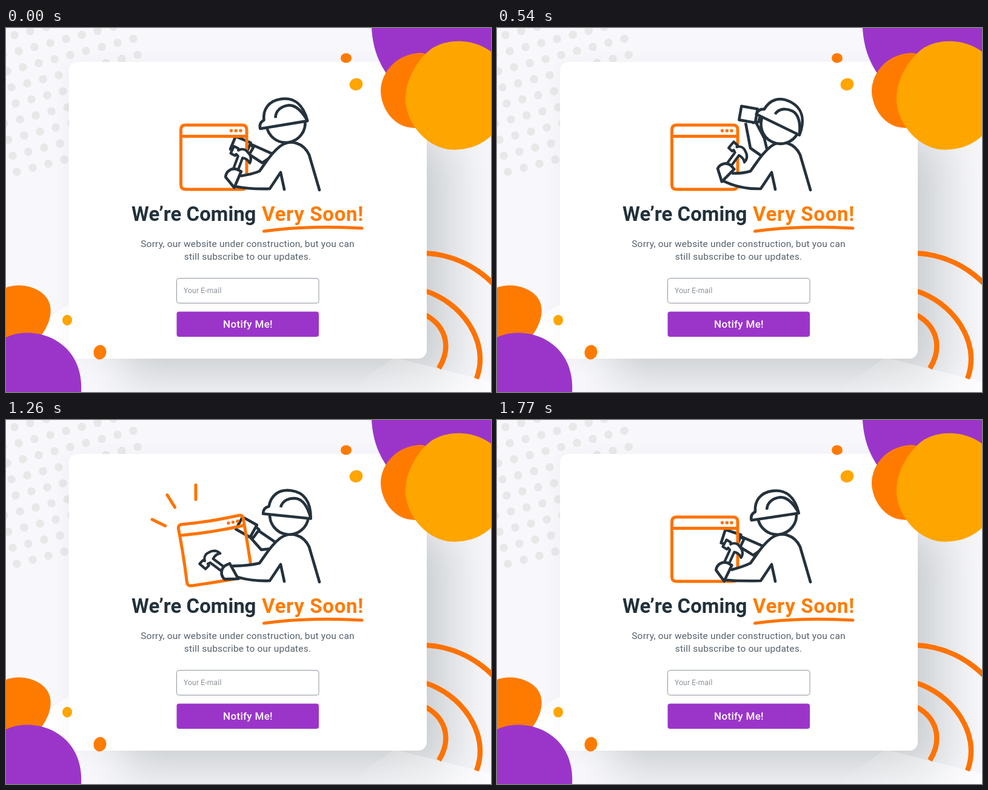
Recreate the animation shown at these times as an HTML page. Size 800 by 600 pixels, loop 1.8 s.

```html
<!DOCTYPE html>
<html lang="en">
<head>
<meta charset="utf-8">
<title>Coming soon</title>
<style>
  html, body { margin: 0; width: 100%; height: 100%; overflow: hidden; background: #f8f8fc; }
  svg { position: absolute; left: 0; top: 0; width: 800px; height: 600px; }
  text { font-family: Rubik, Roboto, Inter, sans-serif; }
  .title { font-size: 33px; font-weight: 700; }
  .note { font-size: 15.5px; letter-spacing: .2px; fill: #56616c; text-anchor: middle; }
  .hint { font-size: 12px; letter-spacing: .2px; fill: #8b9097; }
  .action { font-size: 17px; font-weight: 500; letter-spacing: .3px; fill: #fff; text-anchor: middle; }
  .orange { fill: #ff7b00; }
  .yellow { fill: #ffa500; }
  .purple { fill: #9b35ca; }
  .line { fill: none; stroke: #ff7200; stroke-width: 5; stroke-linejoin: round; }
  .ink { fill: #fff; stroke: #25323c; stroke-width: 4.6; stroke-linejoin: round; }
  .open { fill: none; }
</style>
</head>
<body>
<svg viewBox="0 0 800 600">
  <defs>
    <filter id="soft" x="-30%" y="-30%" width="160%" height="160%"><feGaussianBlur stdDeviation="36"/></filter>
    <filter id="faint" x="-30%" y="-30%" width="160%" height="160%"><feGaussianBlur stdDeviation="16"/></filter>
    <linearGradient id="fade"><stop stop-color="#fff" stop-opacity="0"/><stop offset="1" stop-color="#fff" stop-opacity=".6"/></linearGradient>
  </defs>
  <rect width="800" height="600" fill="#f8f8fc"/>
  <g id="dots" fill="#e8e8e9"></g>
  <path d="M0 520L104 456V600H0Z" fill="#fff"/>
  <rect x="104" y="60" width="590" height="485" fill="#8d9296" opacity=".09" filter="url(#faint)"/>
  <rect x="190" y="180" width="555" height="405" fill="#737f7d" opacity=".29" filter="url(#soft)"/>
  <path d="M640 543L800 583V600H560Z" fill="url(#fade)"/>
  <g class="line" style="stroke-width:8.5">
    <path d="M690 371C735 373 775 392 806 424"/>
    <path d="M690 433C748 450 800 515 776 578"/>
    <path d="M690 472C725 490 736 525 714 561"/>
  </g>
  <rect x="104" y="56" width="590" height="489" rx="14" fill="#fff"/>

  <path class="purple" d="M603 0C605 30 612 52 628 76L700 80L800 60V0Z"/>
  <path class="orange" d="M618 104C618 73 645 41 686 41L720 50V150L682 164C645 170 619 137 618 104Z"/>
  <path class="yellow" d="M659 116C659 85 680 48 705 32C735 15 775 20 800 39V178C780 196 755 203 728 200C690 193 659 155 659 116Z"/>
  <ellipse class="orange" cx="561" cy="49.500" rx="9" ry="8"/>
  <ellipse class="yellow" cx="577.500" cy="93" rx="11" ry="10" transform="rotate(-15 577 93)"/>
  <path class="orange" d="M0 428C20 420 50 425 65 442C80 460 74 485 58 507L0 530Z"/>
  <path class="purple" d="M0 510C20 500 50 500 75 511C110 528 126 560 124 600H0Z"/>
  <ellipse class="yellow" cx="101" cy="481.500" rx="8" ry="8.800"/>
  <ellipse class="orange" cx="155" cy="534.500" rx="10.500" ry="12" transform="rotate(12 155 534)"/>

  <text class="title" x="207" y="318" fill="#22313b">We’re Coming</text>
  <text class="title orange" x="422" y="318" letter-spacing=".7">Very Soon!</text>
  <path class="line" d="M425.500 335Q500 325 587 330" stroke-linecap="round"/>
  <text class="note" x="398.500" y="361">Sorry, our website under construction, but you can</text>
  <text class="note" x="398.500" y="382">still subscribe to our updates.</text>
  <rect x="281.500" y="412.500" width="234.500" height="41" rx="4" fill="#fff" stroke="#8f959d"/>
  <text class="hint" x="293" y="437">Your E-mail</text>
  <rect class="purple" x="281.500" y="467.500" width="234.500" height="41.500" rx="4"/>
  <text class="action" x="399" y="494">Notify Me!</text>

  <path id="farArm" class="ink"/>
  <g id="farHand" class="ink">
    <path d="M11 -9L20 -7L18 9L8 12"/>
    <path d="M-14 -12H13V11H-14Z"/>
  </g>
  <path id="frame" class="line"/>
  <path id="bar" class="line"/>
  <g id="buttons" fill="#ff7200"><circle r="2.700"/><circle r="2.700"/><circle r="2.700"/></g>
  <path id="body" class="ink" style="stroke:none"/>
  <path id="outline" class="ink open" stroke-linecap="round"/>
  <path id="hammer" class="ink" style="stroke-width:4.200"
    d="M-4 0L-4 -36L-8 -38L-9 -35L-17 -36L-16 -49L-8 -48L-7 -45C-3 -50 3 -51 8 -48C15 -45 19 -40 18 -32C14 -36 10 -37 4 -36L4 0Z"/>
  <path id="mitt" class="ink" d="M0 -14.500L-8 -15C-18 -14 -23 -4 -20 4L0 14.500Z"/>
  <g id="head" class="ink">
    <circle cx="466" cy="156" r="32"/>
    <path d="M423 159Q422 149 431 146C432 128 443 115.500 464 115.500C485 115.500 499 129 502 157.500Z"/>
    <path class="open" d="M450.500 145C452 133 463 127.500 474 127.500C486 128 495 140 501.500 156"/>
  </g>
  <g id="rays" class="line" stroke-linecap="round"></g>
</svg>
<script>
const LOOP = 1800, STEP = 30;
const HITS = [810, 1260], LOOK_UP = 540, LOOK_DOWN = 240;

const el = id => document.getElementById(id);
const set = (id, attrs) => { for (const k in attrs) el(id).setAttribute(k, attrs[k]); };
const mix = (a, b, k) => a + (b - a) * k;
const clamp = v => Math.max(0, Math.min(1, v));
const ease = k => (1 - Math.cos(Math.PI * clamp(k))) / 2;
const xy = p => p.map(v => v.toFixed(2)).join(' ');

// Soft hump: 0 to 1 before the peak, back to 0 after it.
const hump = (t, peak, rise, fall) => ease(1 - (t < peak ? (peak - t) / rise : (t - peak) / fall));

function turn(x, y, deg) {
  const r = deg * Math.PI / 180;
  return [x * Math.cos(r) - y * Math.sin(r), x * Math.sin(r) + y * Math.cos(r)];
}

// The worker looks up quickly, then sinks slowly over the rest of the loop.
function headTilt(t, recoil) {
  const sink = (t - LOOK_UP + LOOP) % LOOP / (LOOP - LOOK_UP + LOOK_DOWN);
  const base = sink <= 1 ? mix(27, -15, sink) : mix(-15, 27, ease((t - LOOK_DOWN) / (LOOK_UP - LOOK_DOWN)));
  return base + 6 * recoil;
}

function drawHead(tilt) {
  const shift = [Math.min(tilt * .53, 1), Math.abs(tilt) * .1];
  set('head', { transform: `translate(${xy(shift)}) rotate(${tilt} 466 157)` });
}

function drawWindow(jolt, recoil) {
  const w = 54.25 * (1 - .07 * recoil), h = 53 * (1 - .1 * recoil - .03 * jolt);
  const sag = 11 * recoil + 2 * jolt;
  const at = (u, v) => {
    const x = (2 * u - 1) * w + sag * 2.2 * v * (1 - v) * (1 - .7 * u);
    const y = (2 * v - 1) * h + sag * 4 * u * (1 - u) * (1 - .85 * v);
    const p = turn(x, y, -9 * jolt);
    return [342.75 + 4 * recoil + 2 * jolt + p[0], 213 + 3 * recoil + 2 * jolt + p[1]];
  };
  const run = (u0, v0, u1, v1) => Array.from({ length: 11 },
    (_, i) => xy(at(mix(u0, u1, i / 10), mix(v0, v1, i / 10)))).join('L');
  const r = .07, q = 1 - r;
  const bend = (u, v) => `Q${xy(at(u, v))} `;
  set('frame', { d: 'M' + run(r, 0, q, 0) + bend(1, 0) + run(1, r, 1, q) + bend(1, 1) +
    run(q, 1, r, 1) + bend(0, 1) + run(0, q, 0, r) + bend(0, 0) + xy(at(r, 0)) });
  set('bar', { d: 'M' + run(0, .175, 1, .175) });
  [...el('buttons').children].forEach((dot, i) =>
    dot.setAttribute('transform', `translate(${xy(at(.765 + i * .071, .087))})`));
}

function drawFarArm(lift) {
  const x = 385 + 30 * lift, y = 199 - 56 * lift;
  const dx = 430 - x, dy = 205 - y, len = Math.hypot(dx, dy);
  const edge = s => xy([x + (dx * 12 - dy * 8 * s) / len, y + (dy * 12 + dx * 8 * s) / len]);
  const elbow = [mix(423, 418, lift), mix(224, 198, lift)];
  const shoulder = [441, mix(210, 182, lift)];
  set('farArm', { d: `M${edge(1)}L${xy(elbow)}L438 212L446 203L${xy(shoulder)}L${edge(-1)}` });
  set('farHand', { transform: `translate(${xy([x, y])}) rotate(${10 + 30 * Math.sin(2 * Math.PI * lift)})` });
}

function drawNearArm(strike, lift) {
  const arc = Math.sin(Math.PI * strike), droop = 1 - lift;
  const x = 381 - 5 * strike + 9 * arc, y = 243 + 10 * droop - 15 * arc;
  const tilt = 45 - 62 * strike - 20 * droop;
  const swing = 36 - 82 * strike - 12 * droop;
  const point = (px, py) => { const p = turn(px, py, tilt); return [x + p[0], y + p[1]]; };
  const top = point(3, -8), bottom = point(1, 12);
  const arm = `M${xy(top)}Q${xy([mix(top[0], 418, .6), mix(top[1], 240, .7)])} 418 236` +
    'C426 226 436 207 452 195C470 182 491 190 500 209L517 267';
  const belly = xy([mix(bottom[0], 436, .45), 266]);
  set('body', { d: `${arm}L459 266L453 238L435 265Q${belly} ${xy(bottom)}Z` });
  set('outline', { d: `${arm}M${xy(bottom)}Q${belly} 435 265L453 238L459 266` });
  set('hammer', { transform: `translate(${xy(point(-9, 0))}) rotate(${swing})` });
  set('mitt', { transform: `translate(${xy([x, y])}) rotate(${tilt})` });
}

// Rays fan out around one point, then shrink from their inner ends.
function drawRays(t) {
  const age = t - (t < HITS[1] - 60 ? HITS[0] : HITS[1]);
  const from = clamp((age - 30) / 90), to = clamp((age + 60) / 60);
  [...el('rays').children].forEach((ray, i) => {
    const inner = 68 - 3 * i * i;
    const at = k => xy([313, 199 - inner - 24 * k]);
    ray.setAttribute('transform', `rotate(${-32 * i} 313 199)`);
    ray.setAttribute('d', from < to ? `M${at(from)}L${at(to)}` : '');
  });
}

function draw(now) {
  const t = Math.floor((now % LOOP) / STEP) * STEP;
  const most = (rise, fall) => Math.max(...HITS.map(h => hump(t, h, rise, fall)));
  const jolt = most(60, 120);
  const recoil = hump(t, HITS[0] + 180, 120, 120);
  const practice = .55 * hump(t, LOOK_DOWN, 300, 300);
  const rise = t > HITS[0] && t < HITS[1] - 120 ? 0 : most(120, 432);
  const strike = Math.max(practice, rise || hump(t, HITS[0], 120, 432));
  const tilt = headTilt(t, recoil);
  const lift = Math.min(1, Math.abs(tilt + 6) / 33);
  drawHead(tilt);
  drawWindow(jolt, recoil);
  drawFarArm(lift);
  drawNearArm(strike, lift);
  drawRays(t);
}

function add(parent, tag, attrs) {
  const node = document.createElementNS('http://www.w3.org/2000/svg', tag);
  for (const k in attrs) node.setAttribute(k, attrs[k]);
  el(parent).append(node);
}

for (let a = 0; a < 10; a++)
  for (let b = 0; b < 10; b++)
    add('dots', 'circle', { cx: 18 + a * 26 - b * 7, cy: 237 - a * 6.7 - b * 26.5, r: 6.8 });
for (let i = 0; i < 3; i++) add('rays', 'path', {});

const start = performance.now();
function tick() {
  draw(performance.now() - start);
  requestAnimationFrame(tick);
}
tick();
</script>
</body>
</html>
```
